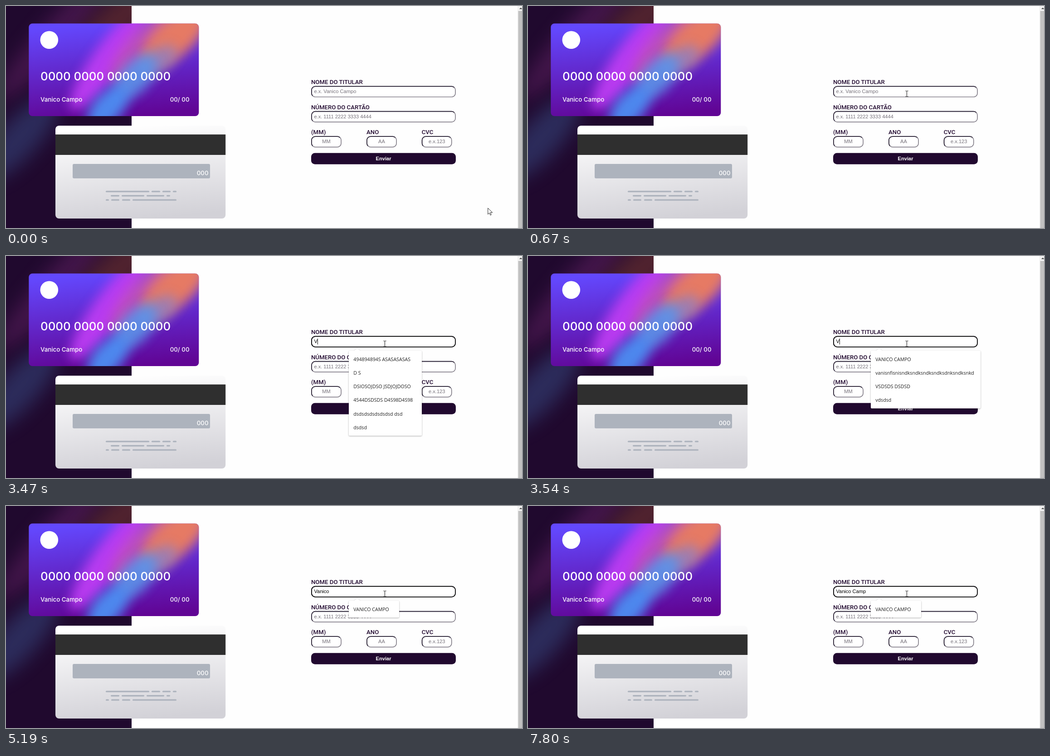
An HTML page for the animation above (8000 ms loop, 1138 by 492 pixels).

```html
<!DOCTYPE html>
<html lang="pt">
<head>
<meta charset="utf-8">
<title>Cartão</title>
<style>
html, body { margin: 0; width: 100%; height: 100%; overflow: hidden; background: #fefefe; }
svg { display: block; width: 1138px; height: 492px; }
text { white-space: pre; }
.card { font-family: Inter, sans-serif; font-weight: 500; font-size: 13.3px; fill: #fff; }
.label { font: 500 13.2px Roboto, sans-serif; fill: #21092f; }
.input { font: 11.1px "Liberation Sans", Arial, sans-serif; fill: #000; }
.hint { fill: #757079; }
.item { font: 10.6px "Open Sans", sans-serif; fill: #222; }
.soft { filter: blur(13px); }
.softer { filter: blur(20px); }
.end { text-anchor: end; }
.mid { text-anchor: middle; }
#drop { filter: drop-shadow(0 1px 1.5px rgba(0, 0, 0, .32)); }
</style>
</head>
<body>
<svg id="stage" viewBox="0 0 1138 492">
  <defs>
    <linearGradient id="frontFill" x1=".38" y1="0" x2=".55" y2="1">
      <stop offset="0" stop-color="#6348fe"/><stop offset="1" stop-color="#610595"/>
    </linearGradient>
    <linearGradient id="backFill" x1=".38" y1="0" x2=".55" y2="1">
      <stop offset="0" stop-color="#fff"/><stop offset="1" stop-color="#d2d1d7"/>
    </linearGradient>
    <clipPath id="panelClip"><rect width="277" height="492"/></clipPath>
    <clipPath id="frontClip"><rect x="50.3" y="38.8" width="375" height="205.3" rx="8"/></clipPath>
  </defs>

  <g clip-path="url(#panelClip)">
    <rect width="277" height="492" fill="#20092e"/>
    <g id="panelGlow"></g>
  </g>

  <g clip-path="url(#frontClip)">
    <rect x="50" y="38" width="376" height="207" fill="url(#frontFill)"/>
    <g id="frontGlow"></g>
  </g>
  <circle cx="95.3" cy="75.2" r="19.8" fill="#fff"/>
  <g class="card">
    <text x="76" y="165" style="font-size:25.8px">0000 0000 0000 0000</text>
    <text id="holder" x="76" y="211.8"></text>
    <text class="end" x="404.5" y="211.8">00/ 00</text>
  </g>

  <rect x="109" y="265.2" width="375.2" height="205.8" rx="8" fill="url(#backFill)"/>
  <rect x="109" y="284.7" width="375.2" height="45.3" fill="#2f2f2f"/>
  <rect x="147" y="350" width="303" height="32" rx="3" fill="#adb3bd"/>
  <g id="lines" stroke="#adb3bd" stroke-width="3.3" stroke-linecap="round"></g>
  <text class="card end" x="446.5" y="375.4">000</text>

  <g id="form"></g>
  <rect x="673" y="325.8" width="319" height="25" rx="8.3" fill="#21092f"/>
  <text class="input mid" x="832.5" y="342" style="fill:#fff;font-weight:bold">Enviar</text>
  <rect id="focus" x="673.9" y="178.2" width="317.2" height="23.4" rx="8.5" fill="none" stroke="#101010" stroke-width="1.8"/>
  <text id="typed" class="input" x="679.4" y="193"></text>
  <rect id="caret" y="183" width="1" height="13"/>
  <g id="drop"></g>

  <rect x="1128" width="10" height="492" fill="#f1f1f1"/>
  <rect x="1129.7" y="11" width="9" height="481" fill="#c1c1c1"/>
  <path d="M1132 7l3.2-3.4 3.2 3.4z" fill="#505050"/>

  <circle id="click" cx="833.3" cy="192.3" r="10" fill="#ffff4c" style="mix-blend-mode:multiply"/>
  <path id="arrow" d="M0 0v13.8l3.2-3 2.1 5 2.2-.9-2.1-4.9h4.6z" fill="#fff" stroke="#111" stroke-width=".9"/>
  <path id="beam" d="M-3-6.3h2.2l.8.8.8-.8H3M0-5.5v11M-3 6.3h2.2l.8-.8.8.8H3" fill="none" stroke="#111"/>
</svg>

<script>
const LOOP = 8000;
const NAME = 'Vanico Campo';
const $ = id => document.getElementById(id);

function add(parent, tag, attrs, text = '') {
  const el = document.createElementNS('http://www.w3.org/2000/svg', tag);
  for (const key in attrs) el.setAttribute(key, attrs[key]);
  el.textContent = text;
  parent.append(el);
  return el;
}

// Blurred diagonal colour patches: cx, cy, rx, ry, angle, colour, opacity, class
function glow(parent, patches) {
  for (const [x, y, rx, ry, angle, fill, opacity, cls = 'soft'] of patches) {
    add(parent, 'ellipse', { rx, ry, fill, opacity, class: cls,
      transform: `translate(${x} ${y}) rotate(${angle})` });
  }
}

glow($('panelGlow'), [
  [110, 65, 190, 34, -48, '#4a1850', .85, 'softer'],
  [240, 40, 120, 45, -45, '#56262f', .9, 'softer'],
  [30, 292, 120, 42, -48, '#2d2e5e', .95, 'softer'],
]);

glow($('frontGlow'), [
  [228, 115, 140, 34, -54, '#bd3df2', .95],
  [300, 90, 105, 34, -50, '#c553b4', .8],
  [372, 68, 90, 42, -42, '#e67a64', 1],
  [335, 122, 48, 26, -35, '#957fbc', .85],
  [285, 158, 62, 32, -48, '#5c94e8', .9],
  [224, 226, 58, 32, -48, '#4c8ff2', .95],
]);

const dashes = {
  411.2: [[220, 316], [321, 340], [345, 363], [368, 376]],
  420.6: [[231, 250], [255, 305], [310, 349], [354, 362]],
  429.9: [[220, 227], [232, 250], [256, 274], [279, 376]],
};
for (const y in dashes) {
  for (const [a, b] of dashes[y]) add($('lines'), 'path', { d: `M${a + 1.6} ${y}H${b - 1.6}` });
}

// Input with inset border: light all round, dark over the top and left
function field(x, y, w, label, hint, centred) {
  const form = $('form'), l = x + .9, t = y + .9, r = x + w - .9, h = 23.4, c = 8.3, k = c * .3;
  add(form, 'text', { x, y: y - 4.3, class: 'label' }, label);
  add(form, 'rect', { x: l, y: t, width: w - 1.8, height: h, rx: c,
    fill: '#fff', stroke: '#85808b', 'stroke-width': 1.7 });
  add(form, 'path', { fill: 'none', stroke: '#2d2538', 'stroke-width': 1.7,
    d: `M${l + k} ${t + h - k}A${c} ${c} 0 0 1 ${l} ${t + h - c}V${t + c}A${c} ${c} 0 0 1 ${l + c} ${t}` +
       `H${r - c}A${c} ${c} 0 0 1 ${r - k} ${t + k}` });
  return add(form, 'text', { x: centred ? x + w / 2 : x + 6.4, y: y + 15.8,
    class: 'input hint' + (centred ? ' mid' : '') }, hint);
}

const hint = field(673, 177.2, 319, 'NOME DO TITULAR', 'e.x. ' + NAME);
field(673, 232.8, 319, 'NÚMERO DO CARTÃO', 'e.x. 1111 2222 3333 4444');
field(673, 288.3, 67, '(MM)', 'MM', true);
field(795, 288.3, 67, 'ANO', 'AA', true);
field(916.7, 288.3, 67, 'CVC', 'e.x.123', true);
$('holder').textContent = NAME;

const first = NAME.toUpperCase();
const long = 'vanisnfisnisndksndksndksndksdnksndksnkd';
const menus = {
  6: [161, ['494894894S ASASASASAS', 'D S', 'DSIOSOJDSO JSDJOJDOSO',
    '4544DSDSDS D4S98D4S98', 'dsdsdsdsdsdsdsd dsd', 'dsdsd']],
  4: [242, [first, long, 'VSDSDS DSDSD', 'vdsdsd']],
  2: [242, [first, long]],
  1: [111, [first]],
};
for (const n in menus) {
  const [w, items] = menus[n];
  const g = add($('drop'), 'g', {});
  const h = 7 + 30.2 * n;
  add(g, 'path', { fill: '#fff', d: `M758 210h10l6.5-6 6.5 6h${w - 27}q2 0 2 2v${h - 4}q0 2-2 2H758q-2 0-2-2v-${h - 4}q0-2 2-2z` });
  items.forEach((s, i) => add(g, 'text', { x: 766.3, y: 232.8 + 30.2 * i, class: 'item' }, s));
  menus[n] = g;
}

// time, letters typed, caret visible, menu size
const steps = [
  [0, 0, 0, 0], [2190, 0, 1, 6], [2720, 0, 0, 6], [3270, 0, 1, 6],
  [3470, 1, 1, 6], [3540, 1, 1, 4], [3990, 2, 1, 4], [4060, 2, 1, 2],
  [4200, 3, 1, 2], [4330, 4, 1, 2], [4530, 5, 1, 2], [4660, 6, 1, 1],
  [5190, 6, 0, 1], [5740, 6, 1, 1], [5810, 7, 1, 1], [6140, 8, 1, 1],
  [6670, 8, 0, 1], [6870, 9, 1, 1], [7070, 10, 1, 1], [7270, 11, 1, 1], [7800, 11, 0, 1],
];

const show = (el, on) => { el.style.display = on ? '' : 'none'; };

function drawPointer(t) {
  const p = t < 70 ? 0 : Math.min(9, Math.floor((t - 70) / 75) + 1) / 9;
  const e = p * p * (3 - 2 * p);
  const x = 1062.8 + (835.5 - 1062.8) * e, y = 447.8 + (194.5 - 447.8) * e;
  const beam = p === 1;
  show($('arrow'), !beam);
  show($('beam'), beam);
  $(beam ? 'beam' : 'arrow').setAttribute('transform', `translate(${x} ${y})`);
}

function draw(t) {
  const [, letters, caret, menu] = steps.findLast(s => s[0] <= t);
  const typed = $('typed');
  typed.textContent = NAME.slice(0, letters);
  show(hint, !letters);
  show($('focus'), menu);
  show($('caret'), caret);
  $('caret').setAttribute('x', 679.4 + (letters ? typed.getComputedTextLength() : 0));
  for (const n in menus) show(menus[n], +n === menu);
  show($('click'), t >= 2190 && t < 2260);
  drawPointer(t);
}

function tick(now) {
  draw(now % LOOP);
  requestAnimationFrame(tick);
}
draw(0);
requestAnimationFrame(tick);
</script>
</body>
</html>
```
